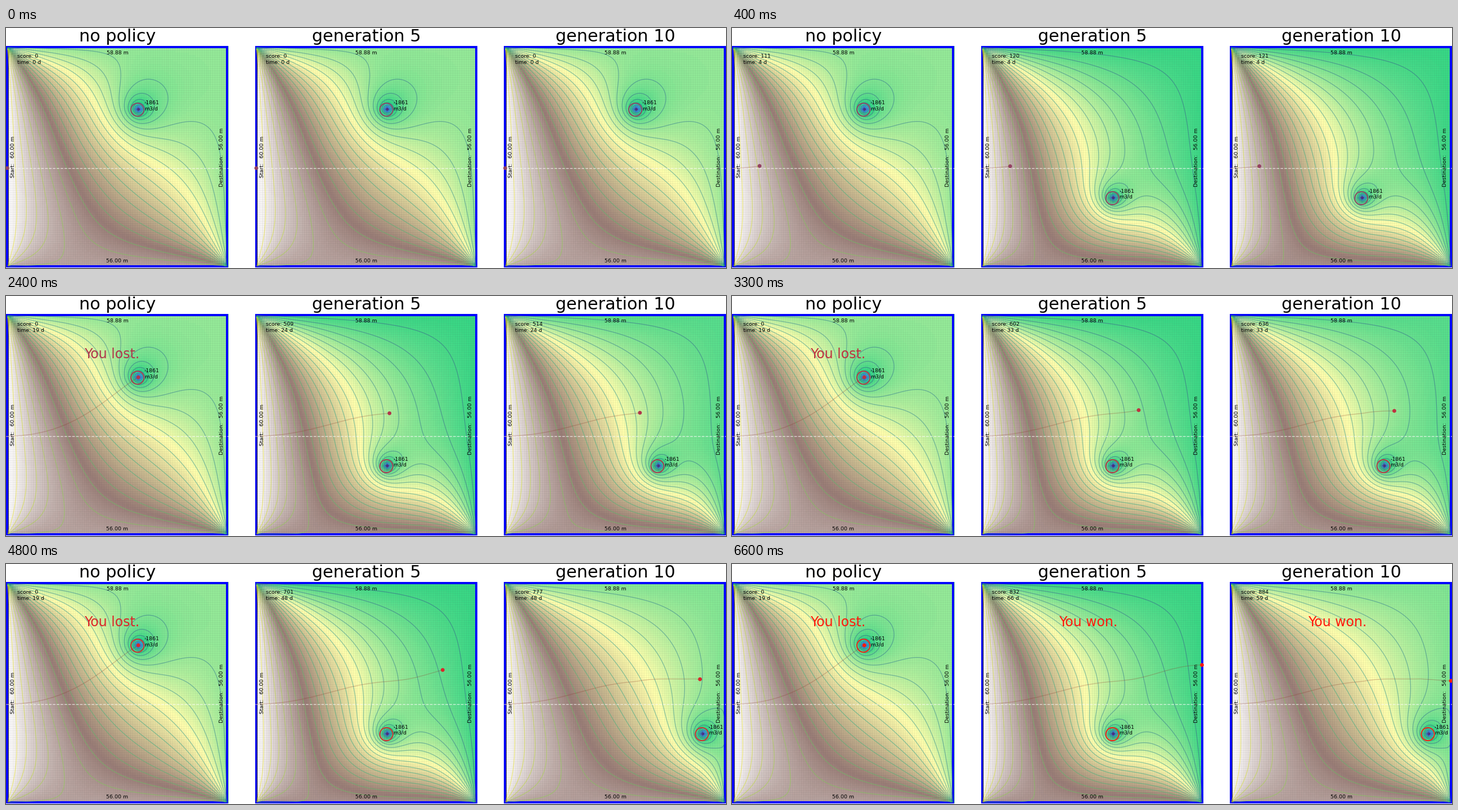
Animation, 1280 px wide and 428 px high, one loop 6.7 s. Source, as a matplotlib script:

```python
import math

import numpy as np
import matplotlib.pyplot as plt
from matplotlib.animation import FuncAnimation
from matplotlib.collections import LineCollection
from matplotlib.patches import Circle, Rectangle

plt.rcParams["font.family"] = "DejaVu Sans"
DPI, W, H = 100, 1280, 428
PT = 72 / DPI                       # points per pixel
DAYS, STEPS = 67, 20                # days per loop, tracking steps per day
CELLS, SIZE, LEFT, TOP, PITCH = 100, 394.5, 0.5, 32.5, 442.5
CELL = SIZE / CELLS
WEST, SOUTH, NORTH, EAST = 60.0, 58.88, 56.0, 56.0   # boundary heads
PUMPING = 3.745                     # well rate over transmissivity
START_ROW, MIDLINE = 54.6, 250
PURPLE, RED = np.array([0.57, 0.26, 0.39]), np.array([1.0, 0.1, 0.05])

fig = plt.figure(figsize=(W / DPI, H / DPI), dpi=DPI, facecolor="white")
ax = fig.add_axes([0, 0, 1, 1])
ax.axis("off")

# Steady groundwater flow, solved by diagonalising the 1D Laplacian.
n = CELLS - 2
eig, vec = np.linalg.eigh(2 * np.eye(n) - np.eye(n, k=1) - np.eye(n, k=-1))
flow_cache = {}


def flow(well):
    """Heads and their row and column gradients for a well at (row, col)."""
    if well not in flow_cache:
        row, col = well
        heads = np.zeros((CELLS, CELLS))
        heads[-1], heads[:, 0], heads[0], heads[:, -1] = SOUTH, WEST, NORTH, EAST
        rhs = np.zeros((n, n))
        rhs[0] += NORTH
        rhs[-1] += SOUTH
        rhs[:, 0] += WEST
        rhs[:, -1] += EAST
        rhs[row - 1, col - 1] -= PUMPING
        modes = (vec.T @ rhs @ vec) / (eig[:, None] + eig)
        heads[1:-1, 1:-1] = vec @ modes @ vec.T
        flow_cache[well] = heads, *np.gradient(heads)
    return flow_cache[well]


def sample(grid, row, col):
    """Bilinear interpolation between cell centres."""
    i, j = min(int(row), CELLS - 2), min(int(col), CELLS - 2)
    a, b = row - i, col - j
    return ((1 - a) * ((1 - b) * grid[i, j] + b * grid[i, j + 1])
            + a * ((1 - b) * grid[i + 1, j] + b * grid[i + 1, j + 1]))


def drift(well_at, days, speed):
    """Carry a particle down the head gradient; tell whether it arrived."""
    row, col, arrived = START_ROW, 0.0, False
    track = [(row, col)]
    for step in range(days * STEPS):
        well = well_at(step // STEPS + 1)
        if not arrived:
            _, by_row, by_col = flow(well)
            slope = sample(by_row, row, col), sample(by_col, row, col)
            row -= speed / STEPS * slope[0]
            col -= speed / STEPS * slope[1]
            if math.dist((row, col), well) < 2:
                (row, col), arrived = well, True
            elif col > CELLS - 1.1:
                col, arrived = CELLS - 1, True
        track.append((row, col))
    return np.array(track), arrived


def timed_track(well_at, days):
    """Bisect the flow speed so that the particle arrives on the last day."""
    slow, fast = 30, 90
    for _ in range(13):
        speed = (slow + fast) / 2
        if drift(well_at, days, speed)[1]:
            fast = speed
        else:
            slow = speed
    return drift(well_at, days, fast)[0]


def score_track(track):
    """Progress to the right, reduced by sideways movement."""
    dy, dx = np.abs(np.diff(track[::STEPS], axis=0)).T
    gain = dx - dy * (0.75 + 0.9 * dy / dx.clip(0.1))
    return np.append(0, np.cumsum(gain)) * 1000 / (CELLS - 1)


def label(x, y, s, size=9.35, **kw):
    return ax.text(x, y, s, fontsize=size * PT, va="baseline", zorder=9, **kw)


def accent(day):
    t = (day / (DAYS - 1)) ** 1.3
    return PURPLE + (RED - PURPLE) * t


def fixed_well(day):
    return 28, 59


def lowered_well(day):
    return 28 + 10 * min(day, 4), 59


def guided_well(day):
    moves = (day >= 24) + (day >= 47) + (day >= 48)
    return lowered_well(day)[0], 59 + 10 * moves


class Panel:
    def __init__(self, index, title, well_at, end, result):
        self.shift = s = PITCH * index
        self.x0 = LEFT + s
        self.well_at, self.end = well_at, end
        track = timed_track(well_at, end)
        self.scores = score_track(track)
        if "lost" in result:
            self.scores[-1] = 0
        self.ys, self.xs = (track.T + 0.5) * CELL + [[TOP], [self.x0]]
        places = {well_at(day) for day in range(DAYS)}
        self.fields = {place: self.draw_field(place) for place in places}
        self.draw_frame(title)

        self.path, = ax.plot([], [], color="#8a3222", alpha=0.25, lw=1.5 * PT, zorder=5)
        self.dot = ax.add_patch(Circle((0, 0), 3.4, lw=0, zorder=7))
        self.ring = ax.add_patch(Circle((0, 0), 11.6, fill=False, lw=1.8 * PT, zorder=6))
        self.rate = [label(0, 0, "-1861"), label(0, 0, "m3/d")]
        self.score = label(20 + s, 53.3, "")
        self.time = label(20 + s, 63.6, "")
        self.result = label(139 + s, 111, result, 23.6)

    def draw_field(self, place):
        heads = flow(place)[0]
        image = ax.imshow(heads, cmap="terrain", alpha=0.8, interpolation="nearest",
                          extent=(self.x0, self.x0 + SIZE, TOP + SIZE, TOP),
                          aspect="auto", zorder=1)
        centres = (np.arange(CELLS) + 0.5) * CELL
        levels = np.linspace(heads.min(), heads.max(), 30)
        lines = ax.contour(self.x0 + centres, TOP + centres, heads, levels,
                           cmap="viridis", alpha=0.5, linewidths=1.25 * PT, zorder=4)
        return image, lines

    def draw_frame(self, title):
        x0, s = self.x0, self.shift
        ticks = np.arange(1, CELLS) * CELL
        grid = [[(x0 + t, TOP), (x0 + t, TOP + SIZE)] for t in ticks]
        grid += [[(x0, TOP + t), (x0 + SIZE, TOP + t)] for t in ticks]
        ax.add_collection(LineCollection(grid, colors="#404040", alpha=0.07,
                                         lw=0.7 * PT, zorder=2))
        ax.add_patch(Rectangle((x0 + CELL / 2, TOP + CELL / 2), SIZE - CELL, SIZE - CELL,
                               fill=False, ec="blue", lw=CELL * PT, zorder=3))
        ax.plot([x0 + 3.3] * 2, [TOP + 5, TOP + SIZE - 3], color="black",
                alpha=0.7, lw=1.2 * PT, zorder=3.5)
        ax.plot([s, s + 396], [MIDLINE] * 2, "--", color="white", alpha=0.7,
                lw=1.3 * PT, zorder=4.5)
        label(198 + s, 24, title, 30.2, ha="center")
        label(198 + s, 47.2, "58.88 m", ha="center")
        label(198 + s, 418.2, "56.00 m", ha="center")
        upright = dict(rotation=90, rotation_mode="anchor", ha="center")
        label(15.5 + s, 230, "Start:   60.00 m", **upright)
        label(385.5 + s, 230.5, "Destination:   56.00 m", **upright)

    def update(self, frame):
        day = min(frame, self.end)
        place = self.well_at(frame)
        for key, artists in self.fields.items():
            for artist in artists:
                artist.set_visible(key == place)

        row, col = place
        wx, wy = self.x0 + col * CELL + 0.4, TOP + (row + 1) * CELL - 1.2
        self.ring.center = wx, wy
        self.rate[0].set_position((wx + 12, wy - 10))
        self.rate[1].set_position((wx + 12, wy + 0.4))

        now = day * STEPS
        self.path.set_data(self.xs[:now + 1], self.ys[:now + 1])
        self.dot.center = self.xs[now], self.ys[now]

        colour = accent(frame)
        self.dot.set_facecolor(colour)
        self.ring.set_edgecolor(colour)
        self.result.set_color(colour)
        self.result.set_visible(frame >= self.end)
        self.score.set_text(f"score: {self.scores[day]:.0f}")
        self.time.set_text(f"time: {day} d")


panels = [
    Panel(0, "no policy", fixed_well, 19, "You lost."),
    Panel(1, "generation 5", lowered_well, 66, "You won."),
    Panel(2, "generation 10", guided_well, 59, "You won."),
]

ax.set_xlim(0, W)
ax.set_ylim(H, 0)


def update(frame):
    for panel in panels:
        panel.update(frame)


animation = FuncAnimation(fig, update, frames=DAYS, interval=100, repeat=True,
                          repeat_delay=0)
plt.show()
```
